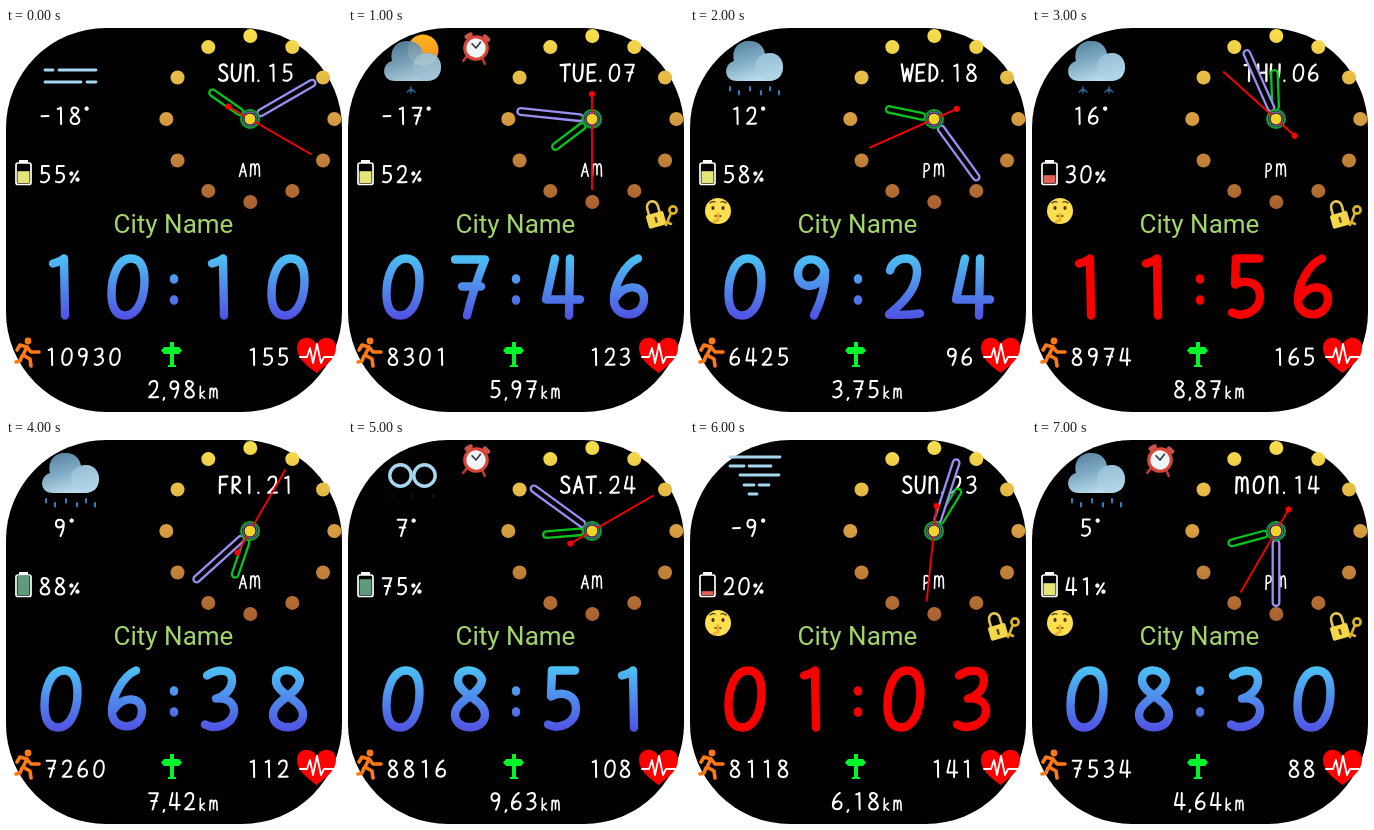
An HTML page that plays this animation: 336 by 384 pixels, repeating every 8000 ms.

```html
<!DOCTYPE html>
<html lang="en">
<head>
<meta charset="utf-8">
<title>Watch face</title>
<style>
html, body { margin: 0; width: 100%; height: 100%; overflow: hidden; background: #fff; }
svg { display: block; width: 336px; height: 384px; }
.ink { fill: none; stroke: #fff; stroke-linecap: round; stroke-linejoin: round; }
.city { font: 26px Roboto, sans-serif; fill: #a2d56c; text-anchor: middle; }
.scene { visibility: hidden; animation: turn 8s step-end infinite; }
@keyframes turn {
  0% { visibility: visible; }
  12.5%, 100% { visibility: hidden; }
}
</style>
</head>
<body>
<svg viewBox="0 0 336 384">
  <defs>
    <linearGradient id="blue" gradientUnits="userSpaceOnUse" x1="0" y1="-5" x2="0" y2="62">
      <stop offset="0" stop-color="#4cc4f4"/><stop offset="1" stop-color="#514fe2"/>
    </linearGradient>
    <linearGradient id="gold" gradientUnits="userSpaceOnUse" x1="0" y1="1" x2="0" y2="181">
      <stop offset="0" stop-color="#f8e04c"/><stop offset=".5" stop-color="#d69c40"/><stop offset="1" stop-color="#a8602f"/>
    </linearGradient>
    <linearGradient id="mist" x1=".2" y1="0" x2=".6" y2="1">
      <stop offset="0" stop-color="#55829f"/><stop offset=".5" stop-color="#82adc6"/><stop offset="1" stop-color="#bfe0ee"/>
    </linearGradient>
    <linearGradient id="sun" x1="0" y1="0" x2="0" y2="1">
      <stop offset="0" stop-color="#ffb51f"/><stop offset="1" stop-color="#f58a1c"/>
    </linearGradient>
    <g id="cloud">
      <path fill="url(#mist)" d="M47 53C33 53 33 36 44 33C41 20 50 12 60 13C69 13 74 19 75 26C86 22 93 30 93 39C93 48 87 53 79 53Z"/>
      <circle cx="79" cy="39" r="14" fill="#a9cfe2" opacity=".6"/>
    </g>
    <g id="alarm" transform="translate(128 20) rotate(8) scale(.9) translate(-128 -21)">
      <path class="ink" style="stroke:#b9382f;stroke-width:3" d="M119 32l-3 5M137 32l3 5"/>
      <path class="ink" style="stroke:#c9554a;stroke-width:5" d="M116 10l4-3M136 7l4 3"/>
      <circle cx="128" cy="21" r="12.5" fill="#eef6f8" stroke="#d8463a" stroke-width="3.5"/>
      <path class="ink" style="stroke:#334;stroke-width:1.8" d="M123 17l5 4l4-7"/>
    </g>
    <g id="hush">
      <circle cx="28" cy="183" r="13" fill="#fde04f"/>
      <g fill="#4b3216"><ellipse cx="23" cy="180" rx="1.6" ry="2"/><ellipse cx="33" cy="180" rx="1.6" ry="2"/></g>
      <path class="ink" style="stroke:#4b3216;stroke-width:1.3" d="M20 175q3-2 5-1M31 174q3-1 5 1M25 188h6"/>
      <path class="ink" style="stroke:#efb02f;stroke-width:3" d="M28 186v6l-4 2"/>
    </g>
    <g id="lock">
      <g transform="rotate(-16 307 188)">
        <path class="ink" style="stroke:#e3c552;stroke-width:2.6" d="M301.500 186v-7a5.500 6 0 0 1 11 0v7"/>
        <rect x="298" y="185" width="18" height="14" rx="2" fill="#f3d64a"/>
        <path class="ink" style="stroke:#5b4310;stroke-width:2.4" d="M307 190v4"/>
      </g>
      <path class="ink" style="stroke:#dcb52a;stroke-width:2.6" d="M323 185l-5 12m1-3l4 2"/>
      <circle cx="325" cy="182" r="3.600" fill="none" stroke="#dcb52a" stroke-width="2.600"/>
    </g>
  </defs>

  <rect width="336" height="384" rx="100"/>
  <g id="ring" fill="url(#gold)"></g>
  <text class="city" x="167.5" y="205">City Name</text>

  <g class="ink" style="stroke:#ff7a14;stroke-width:3.6">
    <path d="M11 322l3-5l7 2l-4 8l7 4l1 7M16 328l-2 5l-4 1M21 319l4 5l8 0"/>
    <circle cx="22" cy="313" r="1.6"/>
  </g>
  <path fill="#00f52a" d="M164 314h4v5h5l3 3.500l-3 3.500h-5v11h2v2h-8v-2h2v-11h-6l-3-3.500l3-3.500h6z"/>
  <path fill="#f00" d="M310.500 345C300 337 291 330 291 320C291 308 306 306 310.500 317C315 306 330 308 330 320C330 330 321 337 310.500 345Z"/>
  <path class="ink" stroke-width="1.800" d="M294 329h7l3-9l3 15l4-19l4 19l3-6h9"/>
</svg>
<script>
const svg = document.querySelector('svg');

// Handwritten glyphs as centre lines, x from -16 to 16, y from 0 to 57.
const zero = 'M3 0C-10 0-16.500 18-16.500 35C-16.500 49-12 57-3 57C10 57 16.500 39 16.500 22C16.500 8 12 0 3 0Z';
const glyphs = {
  0: zero, O: zero,
  1: 'M-8 5Q0 3 3 0L4 57',
  2: 'M-14 12C-12 4-5 0 2 0C16 0 15 18 8 31C2 42-8 50-15 56Q2 57 16 55',
  3: 'M-13 5C-4-1 12-3 12 10C12 19 4 26-4 28C8 27 15 33 14 42C12 54-4 60-15 54',
  4: 'M-7 0L-16 41H18M8 0L7 57',
  5: 'M13 0H-10L-11 26C0 20 14 24 14 38C14 52-2 60-14 54',
  6: 'M8 0C-6 6-17 28-16 43C-14 61 13 60 14 41C15 26-6 24-15 40',
  7: 'M-15 1H15C9 16 2 36-3 57M-8 28H11',
  8: 'M11 7C6-3-12-3-12 10C-12 24 15 29 15 44C15 61-15 61-15 44C-15 30 11 24 12 9',
  9: 'M13 14C10-4-13-3-14 14C-15 32 9 32 13 12C14 30 8 45 2 57',
  A: 'M-15 57L1 0L15 57M-10 37L11 36',
  D: 'M-12 0L-13 57C24 55 22 0-12 0',
  E: 'M14 0L-11 1L-13 57L14 55M-12 28L10 27',
  F: 'M14 0L-11 1L-12 57M-12 28L9 27',
  H: 'M-14 0V57M14 0V57M-14 30L14 27',
  I: 'M0 0V57',
  K: 'M-12-10L-13 57M10 18L-12 36L12 57',
  M: 'M-20 57L-18 2M-19 25C-16-5 0-5 0 20V50M0 25C2-5 18-5 19 20L20 57',
  N: 'M-13 57L-12 2M-13 30C-10-5 14-10 13 20V57',
  P: 'M-13 62L-11 2C18-8 18 36-12 35',
  R: 'M-13 57L-12 2C20-8 20 30-12 31L14 57',
  S: 'M12 6C4-4-14-1-12 13C-10 27 14 26 14 42C14 58-6 60-15 50',
  T: 'M-16 2L16 0M0 1L-1 57',
  U: 'M-14 0C-17 30-17 57-2 57C13 57 15 30 15 0',
  W: 'M-19 0L-10 57L0 15L9 57L19 0',
  '.': 'M0 56V57',
  ',': 'M1 58L-2 65',
  ':': 'M0 20V21M0 41V42',
  '-': 'M-12 30L12 29',
  '°': 'M-3 0a4 4 0 1 0 .1 0',
  '%': 'M12 18L-11 56M-10 22a4 4 0 1 0 .1 0M11 43a4 4 0 1 0 .1 0'
};
const widths = { '.': .4, ',': .4, '°': .67, '%': .9, M: 1.2 };
const widthOf = c => widths[c] || 1;

const glyph = (c, x, y, k, w, color = '#fff') =>
  `<path class="ink" d="${glyphs[c]}" transform="translate(${x} ${y}) scale(${k})" style="stroke:${color};stroke-width:${w / k}"/>`;

// align: 0 left, .5 centre, 1 right
function write(str, x, y, { adv = 15, align = 0, k = .29, w = 2 } = {}) {
  const chars = [...str];
  let at = x - align * adv * chars.reduce((sum, c) => sum + widthOf(c), 0);
  const body = chars.map(c => {
    const step = adv * widthOf(c);
    at += step;
    return glyph(c, at - step / 2, y, k, w);
  }).join('');
  return `<g role="img" aria-label="${str}">${body}</g>`;
}

const stroke = (d, color, w) => `<path class="ink" d="${d}" style="stroke:${color};stroke-width:${w}"/>`;
const use = id => `<use href="#${id}"/>`;

const ice = '#a5d8ee';
const flake = x => stroke(`M${x - 4} 64l4-3l4 3M${x} 59v6`, '#2272a4', 1.4);
const weather = {
  fog: () => stroke('M39 42H47M53 42H90M39 54H75M81 54H90', ice, 2.8),
  sunny: () => '<circle cx="75" cy="22" r="15.500" fill="url(#sun)"/>' +
    `<g opacity=".92">${use('cloud')}</g>` + flake(63),
  snow: () => use('cloud') + flake(51) + flake(77),
  rain: () => use('cloud') +
    [40, 49, 60, 71, 80, 89].map((x, i) => stroke(`M${x} ${59 + i % 2 * 4}v3.500`, '#2f8fd4', 1.8)).join(''),
  haze: () => '<g fill="none" stroke="#a5d8ee" stroke-width="3.400"><circle cx="52.500" cy="35.500" r="10.700"/><circle cx="76.500" cy="35.500" r="10.700"/></g>' +
    stroke('M44 56v.1M64 56v.1M85 56v.1', '#222c33', 1.8),
  storm: () => stroke('M40 17H90M40 26H54M59 26H81M50 35H89M54 45H64M69 45H79M59 54H67', ice, 2.8)
};

function battery(level) {
  const step = Math.ceil(level / 20), h = step * 4;
  const color = step < 3 ? '#e0605a' : step < 4 ? '#e4e478' : '#5d9b7a';
  return '<path fill="#fff" d="M13 132h9v3h-9z"/>' +
    '<rect x="10" y="135" width="15" height="21.500" rx="2" fill="none" stroke="#fff" stroke-width="1.700"/>' +
    `<rect x="11.500" y="${155.2 - h}" width="12" height="${h}" fill="${color}"/>` +
    write(level + '%', 31.5, 138);
}

function hands(h, m, s) {
  const bar = (turn, tip, color) =>
    `<rect x="-3.300" y="${-tip}" width="6.600" height="${tip - 9}" rx="3.300" stroke="${color}" stroke-width="2.300" transform="rotate(${turn})"/>`;
  return '<g transform="translate(244 91)">' +
    bar(h * 30 + m / 2, 49, '#06c41c') + bar(m * 6, 75, '#9a8ff0') +
    '<circle r="9" stroke="#0aa824" stroke-width="2"/><circle r="7" fill="none" stroke="#6f68b8" stroke-width="1.300"/>' +
    `<g transform="rotate(${s * 6})"><path d="M0 25V-71" stroke="#f00" stroke-width="1.800"/><circle cy="25" r="3" fill="#f00"/></g>` +
    '<circle r="5.500" fill="#f0d32c"/></g>';
}

const slots = [55, 122, 168, 214, 282];

function scene(day, date, half, time, sec, power, temp, sky, steps, pulse, km, icons = '') {
  const [h, m] = time.split(':').map(Number);
  const color = power <= 30 ? '#f80000' : 'url(#blue)';
  const digits = [...time].map((c, i) => glyph(c, slots[i], 230.5, 1, 8.4, color)).join('');
  return weather[sky]() +
    write(temp + '°', 59, 79.5, { align: .5 }) +
    battery(power) +
    write(day + '.', 255, 36.5, { adv: day[0] === 'M' ? 15 : 13, align: 1, w: 2.3 }) +
    write(date, 289, 36.5, { align: 1 }) +
    write(half, 243.5, 135.5, { adv: 11, align: .5, k: .225, w: 1.6 }) +
    hands(h, m, sec) +
    `<g role="img" aria-label="${time}">${digits}</g>` +
    write(steps, 37, 320.5, { adv: 16 }) +
    write(pulse, 284.5, 320.5, { align: 1 }) +
    write(km, 140, 353) +
    write('KM', 191.5, 360, { adv: 10, k: .18, w: 1.6 }) +
    icons.split(' ').filter(Boolean).map(use).join('');
}

const scenes = [
  ['SUN', '15', 'AM', '10:10', 20, 55, '-18', 'fog', '10930', '155', '2,98'],
  ['TUE', '07', 'AM', '07:46', 30, 52, '-17', 'sunny', '8301', '123', '5,97', 'alarm lock'],
  ['WED', '18', 'PM', '09:24', 41, 58, '12', 'rain', '6425', '96', '3,75', 'hush'],
  ['THU', '06', 'PM', '11:56', 52, 30, '16', 'snow', '8974', '165', '8,87', 'hush lock'],
  ['FRI', '21', 'AM', '06:38', 5, 88, '9', 'rain', '7260', '112', '7,42'],
  ['SAT', '24', 'AM', '08:51', 10, 75, '7', 'haze', '8816', '108', '9,63', 'alarm'],
  ['SUN', '23', 'PM', '01:03', 31, 20, '-9', 'storm', '8118', '141', '6,18', 'hush lock'],
  ['MON', '14', 'PM', '08:30', 35, 41, '5', 'rain', '7534', '88', '4,64', 'alarm hush lock']
];

let dots = '';
for (let i = 0; i < 12; i++) {
  const a = i * Math.PI / 6;
  dots += `<circle cx="${244.3 + 84 * Math.sin(a)}" cy="${91 - 83 * Math.cos(a)}" r="7"/>`;
}
svg.querySelector('#ring').innerHTML = dots;

svg.insertAdjacentHTML('beforeend', scenes.map((s, i) =>
  `<g class="scene" style="animation-delay:${i - 8}s">${scene(...s)}</g>`).join(''));
</script>
</body>
</html>
```
